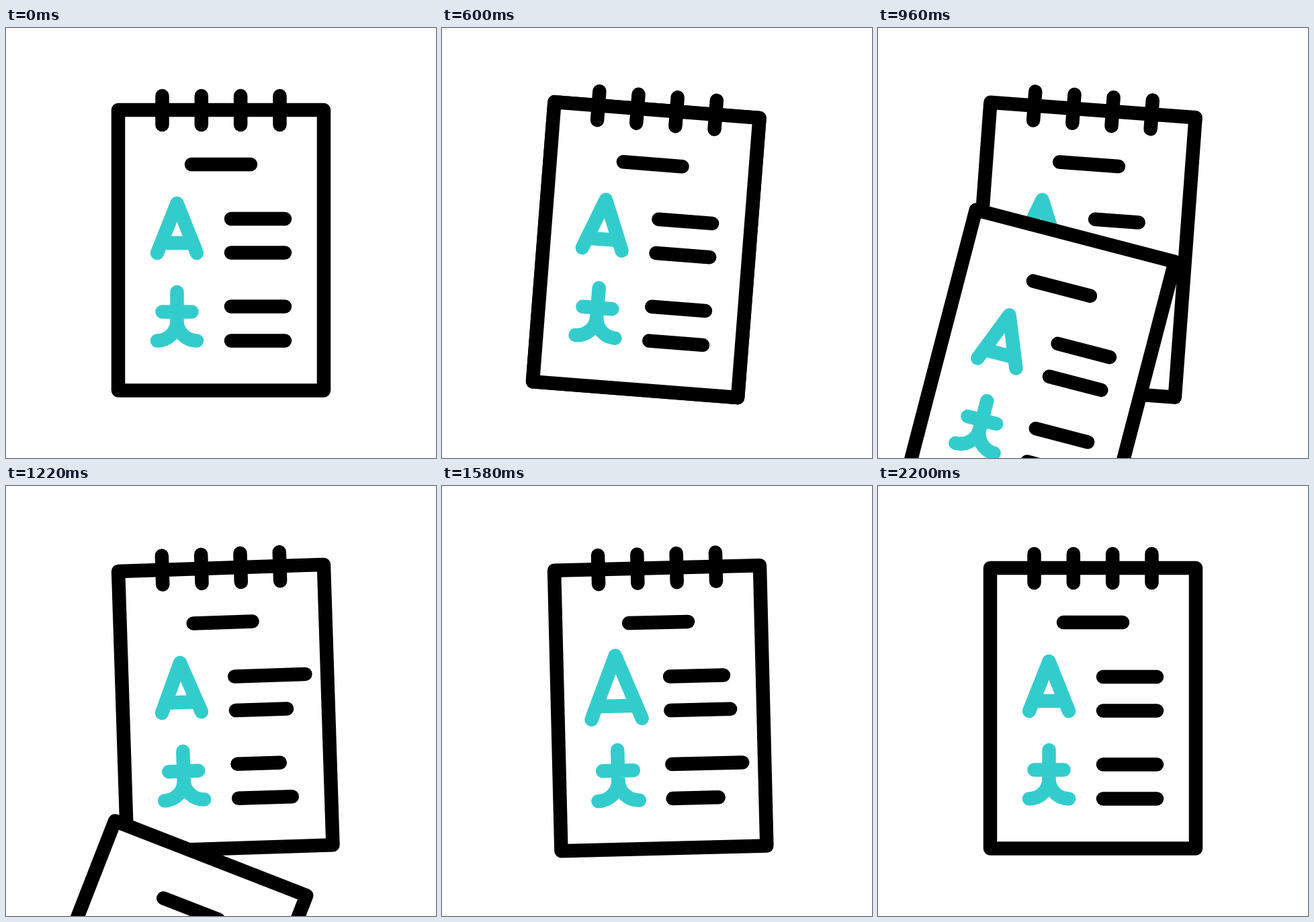
These frames come from a looping animation (640x640 px, 2400 ms). An HTML page with a canvas:

```html
<!DOCTYPE html>
<html lang="en">
<head>
<meta charset="utf-8">
<title>Notepad</title>
<style>
html, body { margin: 0; width: 100%; height: 100%; overflow: hidden; background: #fff; }
canvas { display: block; width: 640px; height: 640px; }
</style>
</head>
<body>
<canvas id="stage" width="640" height="640"></canvas>
<script>
const ctx = document.getElementById('stage').getContext('2d');
const LOOP = 2400;
const INK = '#000';
const TEAL = '#33cccc';
const PIVOT = { x: 320, y: 122 };
const PAGE = { x: 167, y: 122, w: 306, h: 417.5 };

const SWING = [[200, 0], [800, 6], [1400, -4], [1800, 2], [2200, 0]];
const FALL = [[600, 0], [1550, 1]];
const STRETCH = [[600, 1], [900, 0.75], [1200, 1.32], [1500, 1]];
const POP = [[1230, 1], [1510, 1.335], [1770, 1]];
const ROWS = [284, 334.5, 414.5, 465.5];

// Eased value of a list of [time, value] keys.
function track(keys, t) {
  if (t <= keys[0][0]) return keys[0][1];
  for (let i = 1; i < keys.length; i++) {
    const [t0, a] = keys[i - 1];
    const [t1, b] = keys[i];
    if (t < t1) {
      const p = (t - t0) / (t1 - t0);
      return a + (b - a) * p * p * (3 - 2 * p);
    }
  }
  return keys[keys.length - 1][1];
}

function rotateAbout(x, y, degrees) {
  ctx.translate(x, y);
  ctx.rotate(degrees * Math.PI / 180);
  ctx.translate(-x, -y);
}

function line(x1, y1, x2, y2) {
  ctx.beginPath();
  ctx.moveTo(x1, y1);
  ctx.lineTo(x2, y2);
  ctx.stroke();
}

// Scales the path only, so the stroke keeps its weight.
function glyph(cx, cy, scale, build) {
  ctx.save();
  ctx.translate(cx, cy);
  ctx.scale(scale, scale);
  ctx.beginPath();
  build();
  ctx.restore();
  ctx.strokeStyle = TEAL;
  ctx.stroke();
}

function letterA() {
  ctx.moveTo(-29.5, 37);
  ctx.lineTo(0, -37);
  ctx.lineTo(29.5, 37);
  ctx.moveTo(-23.5, 22);
  ctx.lineTo(23.5, 22);
}

function characterWen() {
  ctx.moveTo(-22, -7);
  ctx.lineTo(22, -7);
  ctx.moveTo(0, -36.5);
  ctx.lineTo(0, 6.5);
  ctx.arc(-29.5, 6.5, 29.5, 0, Math.PI / 2);
  ctx.moveTo(0, 6.5);
  ctx.arc(29.5, 6.5, 29.5, Math.PI, Math.PI / 2, true);
}

function sheet(rowScale, scaleA, scaleWen) {
  ctx.beginPath();
  ctx.rect(PAGE.x, PAGE.y, PAGE.w, PAGE.h);
  ctx.fillStyle = '#fff';
  ctx.fill();
  ctx.strokeStyle = INK;
  ctx.stroke();
  line(276, 203, 364, 203);
  ROWS.forEach((y, i) => line(335, y, 335 + 80 * rowScale(i), y));
  glyph(254.5, 298, scaleA, letterA);
  glyph(254.5, 429.5, scaleWen, characterWen);
}

function rings() {
  ctx.strokeStyle = INK;
  for (let i = 0; i < 4; i++) {
    const x = 232.5 + i * 58.33;
    line(x, 101, x, 144);
  }
}

function draw(t) {
  ctx.fillStyle = '#fff';
  ctx.fillRect(0, 0, 640, 640);
  ctx.save();
  ctx.lineWidth = 20.5;
  ctx.lineCap = ctx.lineJoin = 'round';
  rotateAbout(PIVOT.x, PIVOT.y, track(SWING, t));

  sheet(i => track(STRETCH, t - 200 * i), track(POP, t), track(POP, t - 290));

  const fall = track(FALL, t);
  if (fall > 0 && fall < 1) {
    ctx.save();
    ctx.translate(-154 * fall, 573 * fall);
    rotateAbout(320, 330.75, 32 * fall);
    sheet(() => 1, 1, 1);
    ctx.restore();
  }
  rings();
  ctx.restore();
}

const start = performance.now();
function tick() {
  draw((performance.now() - start) % LOOP);
  requestAnimationFrame(tick);
}
tick();
</script>
</body>
</html>
```
